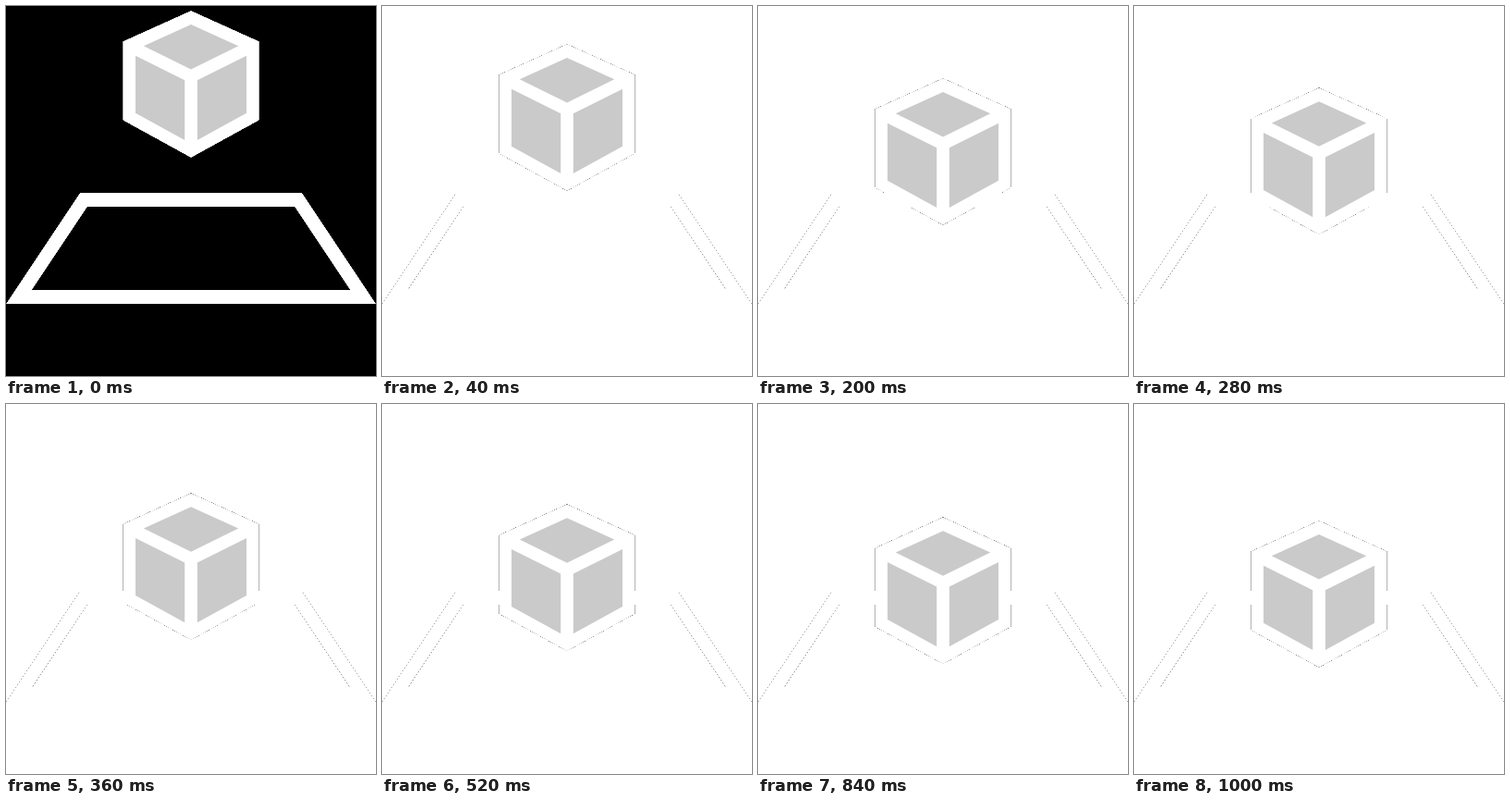
Animation of 400 by 400 pixels, one loop 2040 ms. Source, as an HTML page with a canvas:

```html
<!DOCTYPE html>
<html lang="en">
<head>
<meta charset="utf-8">
<title>Cube drop</title>
<style>
  html, body { margin: 0; width: 100%; height: 100%; overflow: hidden; background: #fff; }
  canvas { display: block; width: 100%; height: 100%; }
</style>
</head>
<body>
<canvas id="stage" width="400" height="400"></canvas>
<script>
const SIZE = 400, LOOP = 2040, STEP = 40, FALL = 1000;
const START_Y = 5, DROP = 121;
const WHITE = '#fff', GREY = '#cacaca', BLACK = '#000';
const ctx = document.getElementById('stage').getContext('2d', { willReadFrequently: true });

const bezier = (s, a, b) => 3 * (1 - s) ** 2 * s * a + 3 * (1 - s) * s * s * b + s ** 3;

// Cubic-bezier ease-out, solved for x by bisection.
function ease(x) {
  if (x <= 0) return 0;
  if (x >= 1) return 1;
  let lo = 0, hi = 1;
  for (let i = 0; i < 30; i++) {
    const mid = (lo + hi) / 2;
    if (bezier(mid, 0, 0.6) < x) lo = mid; else hi = mid;
  }
  return bezier(lo, 0.716, 0.944);
}

function fill(color, points) {
  ctx.beginPath();
  points.forEach(([x, y], i) => i ? ctx.lineTo(x, y) : ctx.moveTo(x, y));
  ctx.closePath();
  ctx.fillStyle = color;
  ctx.fill();
}

function drawFloor() {
  fill(WHITE, [[80, 202], [320, 202], [400, 322], [0, 322]]);
  fill(BLACK, [[88, 216.92], [312, 216.92], [372.1, 307.08], [27.9, 307.08]]);
}

function drawCube(top) {
  const w = 73.7;
  ctx.save();
  ctx.translate(SIZE / 2, top);
  fill(WHITE, [[0, 0], [w, 33.3], [w, 118.5], [0, 159], [-w, 118.5], [-w, 33.3]]);
  fill(GREY, [[0, 15], [51.2, 38.2], [0, 63.5], [-51.2, 38.2]]);
  for (const side of [-1, 1]) {
    fill(GREY, [[side * 60, 48.7], [side * 6.8, 75.2], [side * 6.8, 140], [side * 60, 110.7]]);
  }
  ctx.restore();
}

// Pixels less than half covered count as empty and take the backdrop shade.
function setBackdrop(shade) {
  const image = ctx.getImageData(0, 0, SIZE, SIZE);
  const px = image.data;
  for (let i = 0; i < px.length; i += 4) {
    if (px[i] < 128) px[i] = px[i + 1] = px[i + 2] = shade;
  }
  ctx.putImageData(image, 0, 0);
}

let shown = -1;
function render(now) {
  const time = Math.min(Math.floor((now % LOOP) / STEP) * STEP, FALL);
  if (time === shown) return;
  shown = time;
  ctx.fillStyle = BLACK;
  ctx.fillRect(0, 0, SIZE, SIZE);
  drawFloor();
  drawCube(START_Y + DROP * ease(time / FALL));
  setBackdrop(time > 0 ? 255 : 0);
}

const begin = performance.now();
function tick() {
  render(performance.now() - begin);
  requestAnimationFrame(tick);
}
tick();
</script>
</body>
</html>
```
